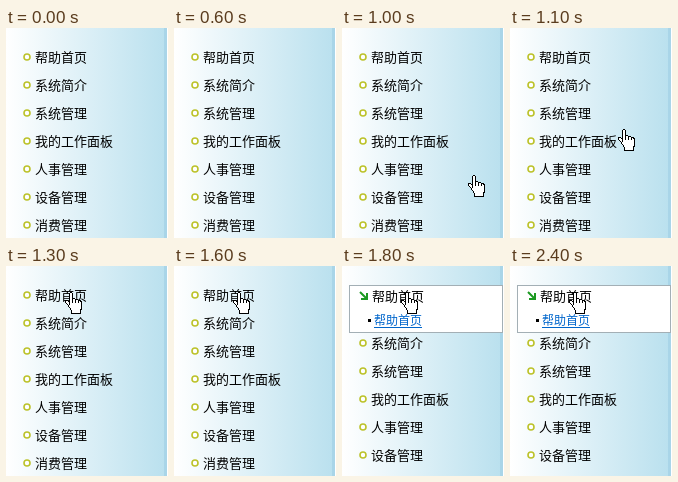
Animation, 162 px wide and 210 px high, one loop 2800 ms. Source, as an HTML page:

```html
<!DOCTYPE html>
<html lang="zh-CN">
<head>
<meta charset="utf-8">
<title>帮助菜单</title>
<style>
html, body { margin: 0; width: 100%; height: 100%; overflow: hidden; background: #fff; }
svg { display: block; width: 162px; height: 210px; }
text { font: 13px "Noto Sans CJK SC", "Noto Sans CJK", sans-serif; fill: #000; }
.ring { fill: #fff; stroke: #bcc22a; stroke-width: 1.6; }
.link { font-size: 12px; fill: #06c; }
.crisp { shape-rendering: crispEdges; }
</style>
</head>
<body>
<svg viewBox="0 0 162 210">
  <defs>
    <linearGradient id="sky">
      <stop stop-color="#fff"/>
      <stop offset="1" stop-color="#b9e0ee"/>
    </linearGradient>
  </defs>
  <rect width="161" height="210" fill="url(#sky)"/>
  <rect x="158" width="3" height="210" fill="#a9d5e8"/>
  <g id="closed"></g>
  <g id="opened">
    <rect class="crisp" x="7.5" y="19.5" width="153" height="47" fill="#fff" stroke="#a3afb5"/>
    <path d="M18 26l6 6M25 27v6h-6" fill="none" stroke="#1c9a22" stroke-width="2"/>
    <text x="30" y="35">帮助首页</text>
    <rect x="26" y="53" width="3" height="3"/>
    <text class="link" x="32" y="59">帮助首页</text>
    <path class="crisp" d="M32 61.5h48" stroke="#06c"/>
  </g>
  <g id="hand" class="crisp" stroke="#000">
    <path fill="#fff" d="M4.5 12.5V1.5l1-1h1l1 1v5h2l1 1h2l1 1h2l1 2v6l-1 2v3h-9v-3l-2-3-2-3-2-2v-2h2l2 2z"/>
    <path fill="none" d="M7.5 6v5M10.5 7v4M13.5 8v3"/>
  </g>
</svg>
<script>
const items = ["帮助首页", "系统简介", "系统管理", "我的工作面板", "人事管理", "设备管理", "消费管理"];
const stops = [[126, 147], [108, 101], [89, 57], [59, 26]];
const el = id => document.getElementById(id);
const show = (node, on) => node.setAttribute("visibility", on ? "visible" : "hidden");

el("closed").innerHTML = items.map((name, i) =>
  `<g transform="translate(0 ${i * 28})"><circle class="ring" cx="21" cy="29" r="3"/>` +
  `<text x="29" y="34">${name}</text></g>`).join("");
const rows = [...el("closed").children];

function draw(now) {
  const t = now % 2800;
  const open = t >= 1800;
  show(el("opened"), open);
  show(rows[0], !open);
  rows.forEach((row, i) => row.setAttribute("transform", `translate(0 ${i * 28 + (open ? 20 : 0)})`));

  // The pointer jumps every 100 ms, then rests on the first item.
  show(el("hand"), t >= 1000);
  const step = Math.max(0, Math.min(3, Math.floor((t - 1000) / 100)));
  el("hand").setAttribute("transform", `translate(${stops[step]})`);
}

const start = performance.now();
function tick() {
  draw(performance.now() - start);
  requestAnimationFrame(tick);
}
tick();
</script>
</body>
</html>
```
